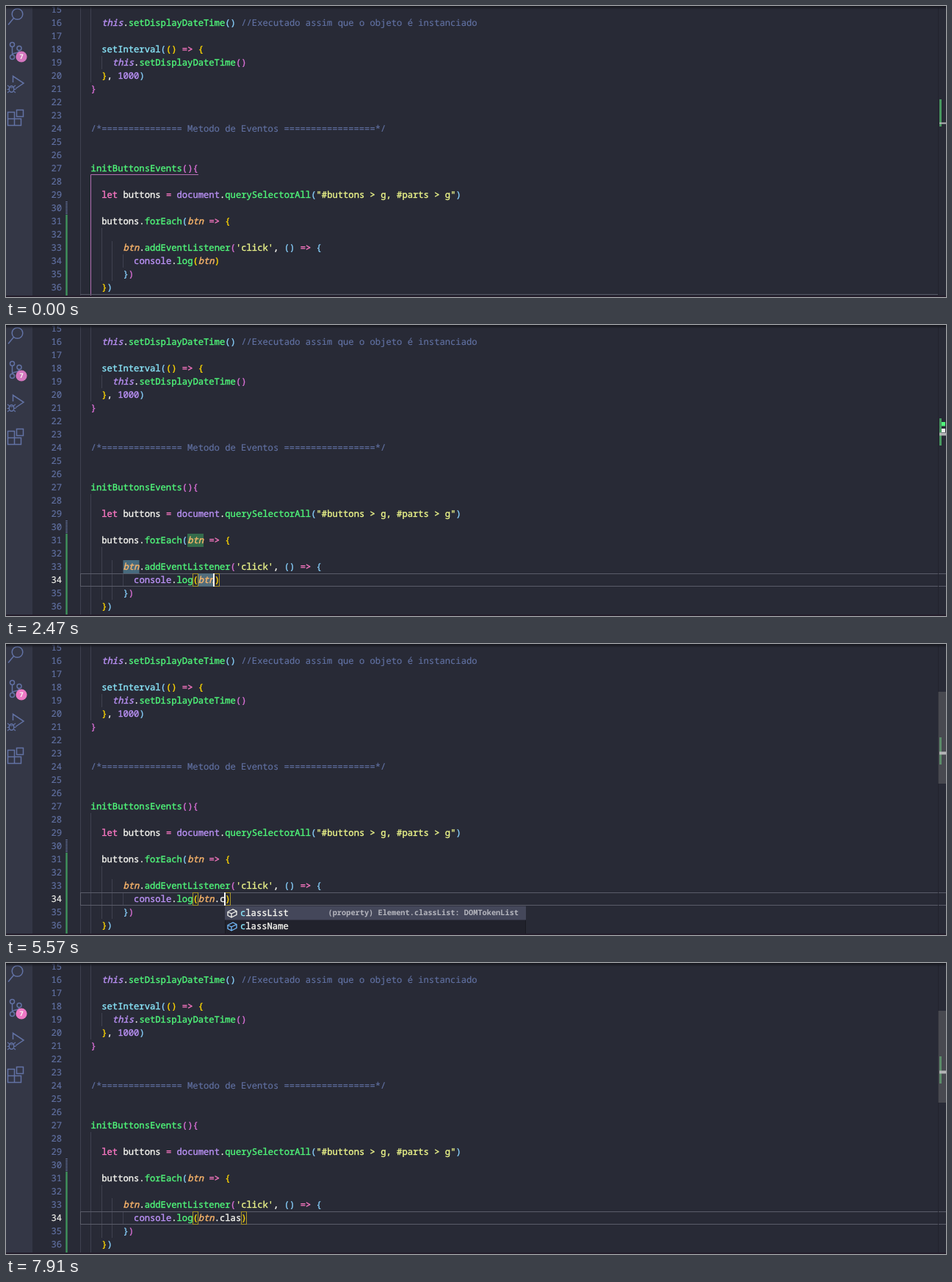
An HTML page for the animation above (8000 ms loop, 1280 px wide and 396 px high).

```html
<!DOCTYPE html>
<html lang="pt">
<head>
<meta charset="utf-8">
<title>Code editor</title>
<style>
  html, body { margin: 0; width: 100%; height: 100%; overflow: hidden; background: #282a36; }
  svg { display: block; }
  text {
    font: 500 12.18px "Noto Sans Mono", "DejaVu Sans Mono", monospace;
    font-variant-ligatures: none;
    text-rendering: geometricPrecision;
    white-space: pre;
    color: #f8f8f2;
  }
  text, tspan { fill: currentColor; stroke: currentColor; stroke-width: .35; }
  .p, .P { color: #bd93f9; }
  .O { color: #ffb86c; }
  .P, .O { font-style: italic; }
  .g { color: #50fa7b; }
  .k { color: #ff79c6; }
  .c { color: #8be9fd; }
  .y { color: #f1fa8c; }
  .m, .num { color: #6272a4; stroke-width: .15; }
  .num { text-anchor: end; }
  .num.on { color: #f8f8f2; }
  .b1 { color: #ffd700; }
  .b2 { color: #da70d6; }
  .b3 { color: #87cefa; }
  .guide { stroke: #3f4150; }
  .icons { fill: none; stroke: #6272a4; stroke-width: 1.5; }
  #detail { font-size: 10.3px; font-weight: 600; color: #b4b5bd; stroke: none; text-anchor: end; }
  #count { font: 700 9px "Noto Sans", sans-serif; stroke: none; text-anchor: middle; }
  .pair { fill: none; stroke: #a8942c; }
  .cube { fill: none; stroke-width: 1.3; stroke-linejoin: round; }
</style>
</head>
<body>
<svg width="1280" height="396" viewBox="0 0 1280 396">
  <defs>
    <linearGradient id="shade" x2="0" y2="1">
      <stop offset="0" stop-color="#15161d"/>
      <stop offset="1" stop-color="#15161d" stop-opacity="0"/>
    </linearGradient>
    <path id="cube" d="M-6-1.5L1-5L6-2.5V2.5L-1 6L-6 3.5ZM-6-1.5L-1 1L6-2.5M-1 1V6"/>
  </defs>
  <rect width="1280" height="396" fill="#282a36"/>

  <!-- activity bar -->
  <rect width="36" height="396" fill="#343746"/>
  <g class="icons">
    <circle cx="15.5" cy="11" r="7.3"/>
    <path d="M10.5 16.5L3 25.5"/>
    <circle cx="8.5" cy="52.5" r="3"/>
    <circle cx="8.5" cy="69.5" r="3"/>
    <circle cx="18" cy="57.5" r="3"/>
    <path d="M8.5 55.5V66.5M18 60.5C18 66 9 62 8.5 66.5"/>
    <path d="M9.5 104V95.5L24 105L13 112.5"/>
    <ellipse cx="7.5" cy="113" rx="3.3" ry="4.3"/>
    <path d="M4.5 111H10.5M2 108L4.5 110M13 108L10.5 110M1.5 113.5H4M11 113.5H13.5M2 118L4.5 116M13 118L10.5 116" stroke-width="1.2"/>
    <path d="M2.5 144.5H11.5V153.5H20.5V162.5H2.5ZM2.5 153.5H11.5V162.5M14.5 141.5H23.5V150.5H14.5Z"/>
  </g>
  <circle id="badge" cx="21" cy="69" r="7.6"/>
  <text id="count" x="21" y="72.3">7</text>

  <!-- gutter changes and indent guides -->
  <path d="M82.5 266V284" stroke="#6676a0" stroke-width="2.4" stroke-dasharray="1 1"/>
  <path d="M82.5 284V396" stroke="#3f935c" stroke-width="2.4"/>
  <path class="guide" d="M101.5 0V396M115.5 0V104M115.5 230V396M130.5 68V86M130.5 302V374M144.5 320V374M159.5 338V356"/>

  <g id="scope" fill="none">
    <path d="M262 229.5H115.5V396" stroke="#b06fb0"/>
    <path d="M101 392.5H1270" stroke="#565866"/>
  </g>
  <rect id="row" x="101.5" y="338.5" width="1190" height="17" fill="none" stroke="#5a5c69"/>

  <g id="marks">
    <rect x="247" y="284" width="22" height="18" fill="#346b4b"/>
    <rect x="159.5" y="320" width="22" height="18" fill="#476a7d"/>
  </g>
  <rect id="pick" x="261.8" y="338" width="22" height="18" fill="#526d7c"/>

  <g id="code"></g>
  <text id="tail" y="351"></text>
  <text id="close" class="b1" y="351">)</text>
  <rect id="open-box" class="pair" x="254.5" y="338.5" width="7" height="17"/>
  <rect id="close-box" class="pair" y="338.5" width="7" height="17"/>
  <rect id="caret" y="338" width="2" height="18" fill="#f8f8f2"/>

  <!-- overview ruler -->
  <path d="M1269.5 0V396" stroke="#22232d"/>
  <rect x="1271" y="127" width="3" height="37" fill="#47985f"/>
  <g id="hits">
    <rect x="1274" y="132" width="5" height="5.5" fill="#50fa7b"/>
    <rect x="1274" y="141" width="5" height="5" fill="#f0f2f0"/>
  </g>
  <rect id="slider" x="1269.5" y="65" width="10.5" height="125" fill="#797979" fill-opacity=".4"/>
  <rect id="spot" x="1271" width="9" fill="#b3b4b6"/>

  <g id="hover">
    <rect x="261.5" y="310.5" width="192" height="27" fill="#282a36" stroke="#6272a4"/>
    <text x="270" y="328.5">(parameter) btn: Element</text>
  </g>

  <g id="popup">
    <rect width="410" height="42" fill="#21222c"/>
    <path d="M0 .5H410M.5 0V42M409.5 0V42" stroke="#191a21"/>
    <rect width="410" height="19" fill="#44475a"/>
    <use href="#cube" x="10" y="9.5" class="cube" stroke="#f8f8f2"/>
    <use href="#cube" x="10" y="27.5" class="cube" stroke="#75beff"/>
    <text id="first" x="21" y="13.5"></text>
    <text id="second" x="21" y="31.5"></text>
    <text id="detail" x="400" y="12.7"></text>
    <rect id="thumb" x="400" width="9.5" height="19" fill="#5f616d"/>
  </g>

  <path id="mouse" d="M-3-7.5Q0-7.5 0-6V6Q0 7.5-3 7.5M3-7.5Q0-7.5 0-6M0 6Q0 7.5 3 7.5" fill="none" stroke="#f4f4f4" stroke-width="1.3"/>
  <circle id="halo" r="11" fill="#d2c814" fill-opacity=".75"/>

  <rect width="1280" height="5" fill="url(#shade)"/>
  <rect y="394" width="1280" height="2" fill="#241d2b"/>
</svg>
<script>
const LOOP = 8000, LEFT = 101, CELL = 7.308, ROW = 18;
const $ = id => document.getElementById(id);
const colX = col => LEFT + col * CELL;
const baseline = n => 27 + (n - 16) * ROW;

// Each token starts with its colour key; 1-3 are bracket levels.
const lines = [
  [16, 4, "Pthis|w.|gsetDisplayDateTime|3()|m //Executado assim que o objeto é instanciado"],
  [18, 4, "csetInterval|3(|1()|k => |1{"],
  [19, 6, "Pthis|w.|gsetDisplayDateTime|2()"],
  [20, 4, "1}|w, |p1000|3)"],
  [21, 2, "2}"],
  [24, 2, "m/*=============== Metodo de Eventos =================*/"],
  [27, 2, "ginitButtonsEvents|2(){"],
  [29, 4, "klet |wbuttons |k= |pdocument|w.|gquerySelectorAll|3(|y\"#buttons > g, #parts > g\"|3)"],
  [31, 4, "wbuttons.|gforEach|3(|Obtn|k => |1{"],
  [33, 8, "Obtn|w.|gaddEventListener|2(|y'click'|w, |3()|k => |3{"],
  [34, 10, "pconsole|w.|glog|1(|Obtn"],
  [35, 8, "3}|2)"],
  [36, 4, "1}|3)"]
];

function addText(x, y, cls, str) {
  const el = document.createElementNS("http://www.w3.org/2000/svg", "text");
  el.setAttribute("x", x);
  el.setAttribute("y", y);
  el.setAttribute("class", cls);
  el.textContent = str;
  $("code").append(el);
  return el;
}

const numbers = {};
for (let n = 15; n <= 36; n++) numbers[n] = addText(76, baseline(n), "num", n);
for (const [n, start, source] of lines) {
  let col = start;
  for (const token of source.split("|")) {
    const key = token[0], str = token.slice(1);
    const lead = str.length - str.trimStart().length;
    addText(colX(col + lead), baseline(n), /\d/.test(key) ? "b" + key : key, str.trim());
    col += str.length;
  }
}
$("tail").setAttribute("x", colX(25));

const within = (t, a, b) => t >= a && t < b;
const ramp = (t, a, b) => Math.min(1, Math.max(0, (t - a) / (b - a)));
const mix = (a, b, k) => a + (b - a) * k;
const show = (id, on) => $(id).style.display = on ? "" : "none";
const set = (id, attrs) => {
  for (const name in attrs) $(id).setAttribute(name, attrs[name]);
};
const latest = (t, steps) => steps.filter(([at]) => t >= at).pop()[1];

const CLICK = 1570;
const typed = [[0, ""], [3040, "."], [5450, ".c"], [5590, ".cl"], [5690, ".cla"],
  [5990, ".clas"], [6350, ".classList"], [7400, ".clas"]];
const popupCols = [[0, 0], [3210, 26], [5520, 27], [5590, 28], [5760, 29], [5990, 30], [6350, 0]];
const blink = [[0, false], [CLICK, true], [2020, false], [2470, true], [3540, false], [4050, true],
  [4540, false], [5050, true], [6820, false], [7330, true], [7910, false]];

function label(id, str, matched) {
  $(id).innerHTML = `<tspan class="c">${str.slice(0, matched)}</tspan>${str.slice(matched)}`;
}

function drawPopup(col) {
  show("popup", col);
  if (!col) return;
  const matched = col - 26;
  set("popup", { transform: `translate(${Math.floor(colX(col))} 356.5)` });
  label("first", matched ? "classList" : "ATTRIBUTE_NODE", matched);
  label("second", matched ? "className" : "CDATA_SECTION_NODE", matched);
  $("detail").textContent = matched
    ? "(property) Element.classList: DOMTokenList"
    : "(property) Node.ATTRIBUTE_NODE: number";
  show("thumb", !matched);
}

function drawMouse(t) {
  const enter = 1 - (1 - ramp(t, 330, 770)) ** 2;
  const nudge = ramp(t, 1400, 1520);
  const leave = ramp(t, 1640, 1780) ** 2;
  const x = mix(113, 289, enter) - 4 * nudge + 14 * leave;
  const y = mix(380, 345, enter) + 65 * leave;
  show("mouse", within(t, 330, 1780));
  show("halo", within(t, 1500, 1640));
  set("mouse", { transform: `translate(${x} ${y})` });
  set("halo", { cx: x - 3, cy: y });
}

function render(t) {
  const active = t >= CLICK;
  const tail = latest(t, typed);
  const end = 25 + tail.length;

  show("scope", !active);
  for (const id of ["row", "open-box", "close-box"]) show(id, active);
  numbers[34].classList.toggle("on", active);
  show("pick", within(t, 1000, 2950));
  show("marks", within(t, 1780, 2950));
  show("hits", within(t, 1810, 2950));
  set("spot", active ? { y: 146.5, height: 4 } : { y: 158.5, height: 2 });
  set("badge", { fill: t < 5450 ? "#d377bf" : "#ee79c5" });

  $("tail").textContent = tail;
  set("close", { x: colX(end) });
  set("close-box", { x: Math.floor(colX(end)) + 0.5 });
  set("caret", { x: Math.floor(colX(end)) - 1 });
  show("caret", latest(t, blink));

  const slider = ramp(t, 330, 450) - ramp(t, 1600, 2400) + ramp(t, 2950, 3050);
  set("slider", { opacity: slider });
  set("hover", { opacity: t < CLICK ? ramp(t, 1050, 1160) : 0 });
  drawPopup(latest(t, popupCols));
  drawMouse(t);
}

const began = performance.now();
(function tick() {
  render((performance.now() - began) % LOOP);
  requestAnimationFrame(tick);
})();
</script>
</body>
</html>
```
